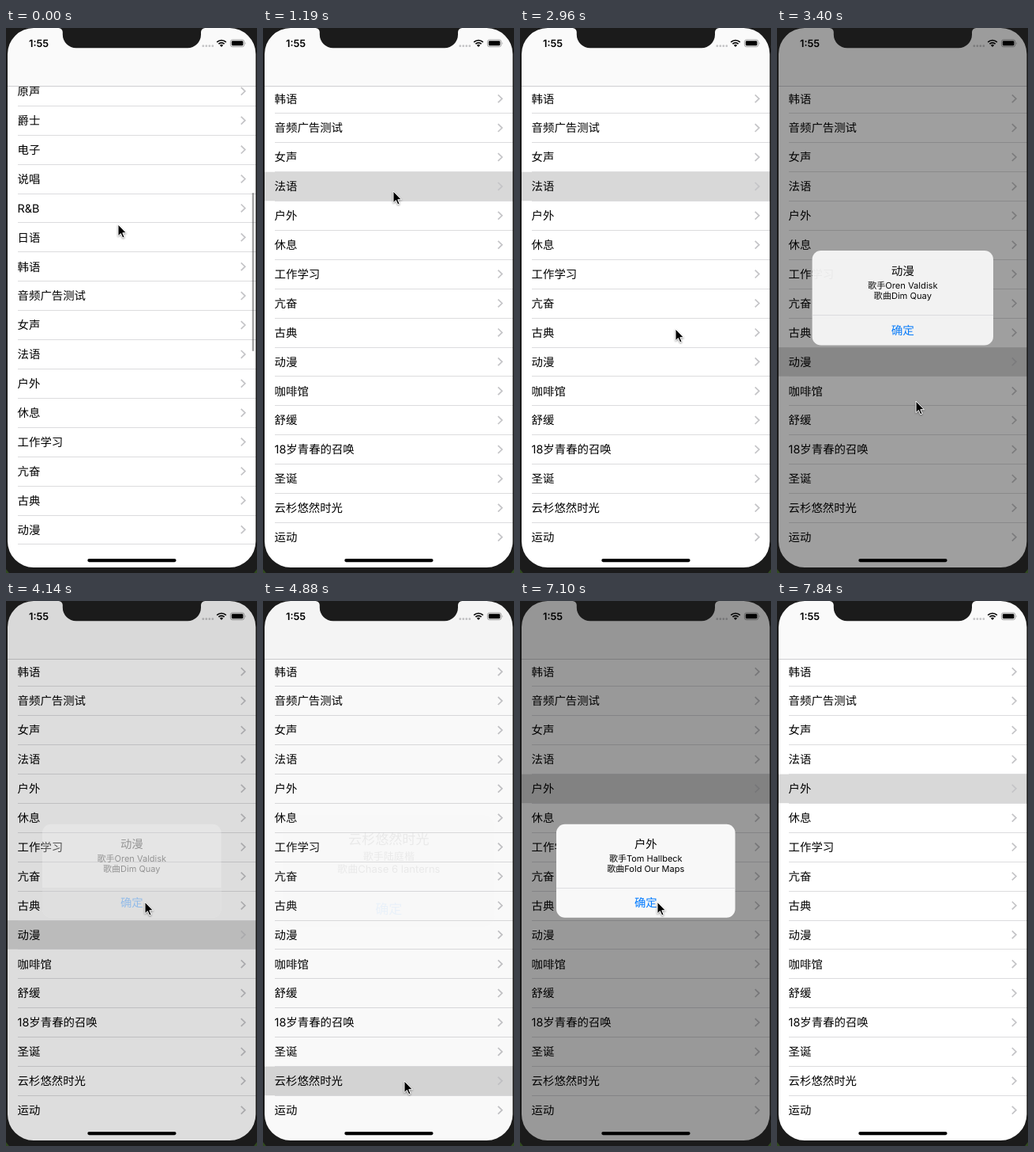
Animation of 318x688 px, one loop 8130 ms. Source, as an HTML page:

```html
<!DOCTYPE html>
<html lang="zh">
<head>
<meta charset="utf-8">
<style>
html, body { margin: 0; width: 100%; height: 100%; overflow: hidden; background: #1b1b1b; }
svg { display: block; width: 318px; height: 688px; text-rendering: geometricPrecision;
  font: 14.4px Inter, "Noto Sans CJK SC", "Noto Sans CJK", sans-serif; }
.line { fill: #dcdcde; shape-rendering: crispEdges; }
.chevron { fill: none; stroke: #c4c4c7; stroke-width: 1.7; }
#alert { text-anchor: middle; }
#alert .bold { font-weight: 500; }
#alert .small { font-size: 11px; }
#cursor { filter: drop-shadow(0 1px 1px rgba(0, 0, 0, .4)); }
</style>
</head>
<body>
<svg viewBox="0 0 318 688">
  <defs>
    <clipPath id="viewport"><rect x="0" y="73" width="318" height="579"/></clipPath>
  </defs>
  <rect width="318" height="688" fill="#fff"/>
  <g clip-path="url(#viewport)">
    <g id="list"><rect id="selected" width="318" height="36.6" fill="#d8d8d8"/></g>
    <rect id="bar" x="311.8" width="2.4" height="200" rx="1.2" fill="#000" fill-opacity=".36"/>
  </g>
  <rect width="318" height="73" fill="#fafafa"/>
  <rect class="line" y="73" width="318" height="1" style="fill:#cfcfd1"/>
  <text x="29" y="23.8" font-size="12.8" font-weight="600">1:55</text>
  <path d="M249.8 22.7h12.1" stroke="#c3c3c5" stroke-width="2.8" stroke-linecap="round" stroke-dasharray="0 4"/>
  <path d="M273 24L270.9 21.8A3 3 0 0 1 275.1 21.8Z"/>
  <path d="M269.4 20.2A5.1 5.1 0 0 1 276.6 20.2M267.2 17.9A8.2 8.2 0 0 1 278.8 17.9" fill="none" stroke="#000" stroke-width="1.7"/>
  <rect x="284.4" y="14.9" width="17.4" height="8.8" rx="2.5" fill="none" stroke="#999" stroke-width=".9"/>
  <rect x="285.8" y="16.3" width="14.6" height="6" rx="1.3"/>
  <path d="M302.9 17.8Q304.3 19.3 302.9 20.9Z" fill="#999"/>
  <rect id="dim" width="318" height="688"/>
  <rect x="103.3" y="670" width="112.3" height="4.2" rx="2.1"/>
  <g fill="#1b1b1b">
    <path fill-rule="evenodd" d="M0 0H318V688H0ZM35 0H283.4A33 33 0 0 1 316.4 33V648A33 33 0 0 1 283.4 681H35A33 33 0 0 1 2 648V33A33 33 0 0 1 35 0Z"/>
    <path d="M66.5 0A5.3 5.3 0 0 1 71.8 5.3V8.2A17 17 0 0 0 88.8 25.2H230A17 17 0 0 0 247 8.2V5.3A5.3 5.3 0 0 1 252.3 0Z"/>
  </g>
  <path d="M0 683L4 688H0ZM318 683L314 688H318Z" fill="#30491f"/>
  <g id="alert">
    <rect x="46" y="281.8" width="226.6" height="118" rx="11" fill="#f8f8f8"/>
    <path id="press" d="M46 362H272.6V388.8A11 11 0 0 1 261.6 399.8H57A11 11 0 0 1 46 388.8Z" fill="#e4e4e6"/>
    <rect x="46" y="362" width="226.6" height=".8" fill="#d9d9dc"/>
    <text id="title" class="bold" x="159.3" y="312.3"></text>
    <text id="artist" class="small" x="159.3" y="329"></text>
    <text id="song" class="small" x="159.3" y="342.4"></text>
    <text class="bold" x="159.3" y="386.4" fill="#007aff">确定</text>
  </g>
  <path id="cursor" d="M0 0V14.6L3.4 11.5L5.8 16.9L8.1 15.9L5.8 10.7H10.4Z" stroke="#fff" stroke-width="1"/>
</svg>
<script>
const LOOP = 8130, STEPS = 55, ROW = 36.9, TOP = 79.8, SCROLL = 212, OK_Y = 380;
const $ = id => document.getElementById(id);
const rows = ['原声', '爵士', '电子', '说唱', 'R&B', '日语', '韩语', '音频广告测试', '女声', '法语', '户外',
  '休息', '工作学习', '亢奋', '古典', '动漫', '咖啡馆', '舒缓', '18岁青春的召唤', '圣诞', '云杉悠然时光', '运动'];

// Times are in steps. The cursor is at (x, y) on `arrive` and on the button (okX) on `ok`.
const visits = [
  { row: 9, artist: 'Velmor', song: 'Marchons Tôt', arrive: 8, x: 165, y: 206, open: 8.7, ok: 14, okX: 197, close: 16.3 },
  { row: 15, artist: 'Oren Valdisk', song: 'Dim Quay', arrive: 23, x: 176, y: 471, open: 21.3, ok: 26, okX: 176, close: 27.2 },
  { row: 20, artist: '陆庭楷', song: 'Chase 6 lanterns', arrive: 32, x: 179, y: 606, open: 32.7, ok: 37, okX: 176, close: 39 },
  { row: 10, artist: 'Tom Hallbeck', song: 'Fold Our Maps', arrive: 40, x: 167, y: 258, open: 43.7, ok: 48, okX: 174, close: 50.2 },
];
const home = [142, 248], exit = { arrive: 53, x: 300, y: 660 };

const clamp = u => Math.max(0, Math.min(1, u));
const smooth = u => (u = clamp(u), u * u * (3 - 2 * u));
const set = (id, attrs) => { for (const key in attrs) $(id).setAttribute(key, attrs[key]); };

function add(name, attrs, text = '') {
  const el = document.createElementNS('http://www.w3.org/2000/svg', name);
  for (const key in attrs) el.setAttribute(key, attrs[key]);
  el.textContent = text;
  return $('list').appendChild(el);
}

const items = rows.map(name => ({
  line: add('rect', { class: 'line', x: 15, width: 303, height: 1 }),
  label: add('text', { x: 14.6 }, name),
  chevron: add('path', { class: 'chevron', d: 'M297.8 -4.9L302.9 0L297.8 4.9' }),
}));

function drawList(k, visit) {
  const scroll = SCROLL * (1 - (1 - clamp(k / 5)) ** 2);
  items.forEach(({ line, label, chevron }, i) => {
    const y = TOP + ROW * i - scroll;
    line.setAttribute('y', Math.round(y + 18.1));
    label.setAttribute('y', y + 5.3);
    chevron.setAttribute('transform', `translate(0 ${y})`);
  });
  set('selected', { y: visit ? TOP + ROW * visit.row - scroll - 18.2 : -ROW });
  set('bar', { y: 208 + scroll * .345, opacity: clamp((8 - k) / 2) });
}

function drawAlert(k, visit) {
  const opened = visit ? smooth((k - visit.open) / 2) : 0;
  const p = visit ? opened * (1 - smooth((k - visit.close) / 1.3)) : 0;
  set('dim', { opacity: p * .4 });
  set('alert', { opacity: p, transform: `translate(159.3 340.8) scale(${1.2 - .2 * opened}) translate(-159.3 -340.8)` });
  if (!visit) return;
  $('title').textContent = rows[visit.row];
  $('artist').textContent = '歌手' + visit.artist;
  $('song').textContent = '歌曲' + visit.song;
  set('press', { opacity: k > visit.close - .25 ? 1 : 0 });
}

// Glides from a to b in up to three steps, ending at `end`
function glide(k, a, b, end, earliest) {
  const start = Math.max(end - 3, earliest);
  const u = smooth((k - start) / (end - start));
  return a.map((v, i) => v + (b[i] - v) * u);
}

function cursorAt(k) {
  const i = visits.findIndex(v => k <= v.close);
  const next = visits[i] || exit, last = i ? visits.at(i - 1) : null;
  const from = last ? [last.okX, OK_Y] : home, spot = [next.x, next.y];
  return k <= next.arrive
    ? glide(k, from, spot, next.arrive, last ? last.close : 0)
    : glide(k, spot, [next.okX, OK_Y], next.ok, next.arrive);
}

function draw(ms) {
  const k = Math.min(STEPS - 1, Math.floor((ms % LOOP + 20) / LOOP * STEPS));
  const visit = visits.findLast(v => k >= v.open - 1);
  drawList(k, visit);
  drawAlert(k, visit);
  const hidden = k >= exit.arrive;
  set('cursor', { opacity: hidden ? 0 : 1 });
  if (!hidden) set('cursor', { transform: `translate(${cursorAt(k)})` });
}

const start = performance.now();
function tick() {
  draw(performance.now() - start);
  requestAnimationFrame(tick);
}
tick();
</script>
</body>
</html>
```
